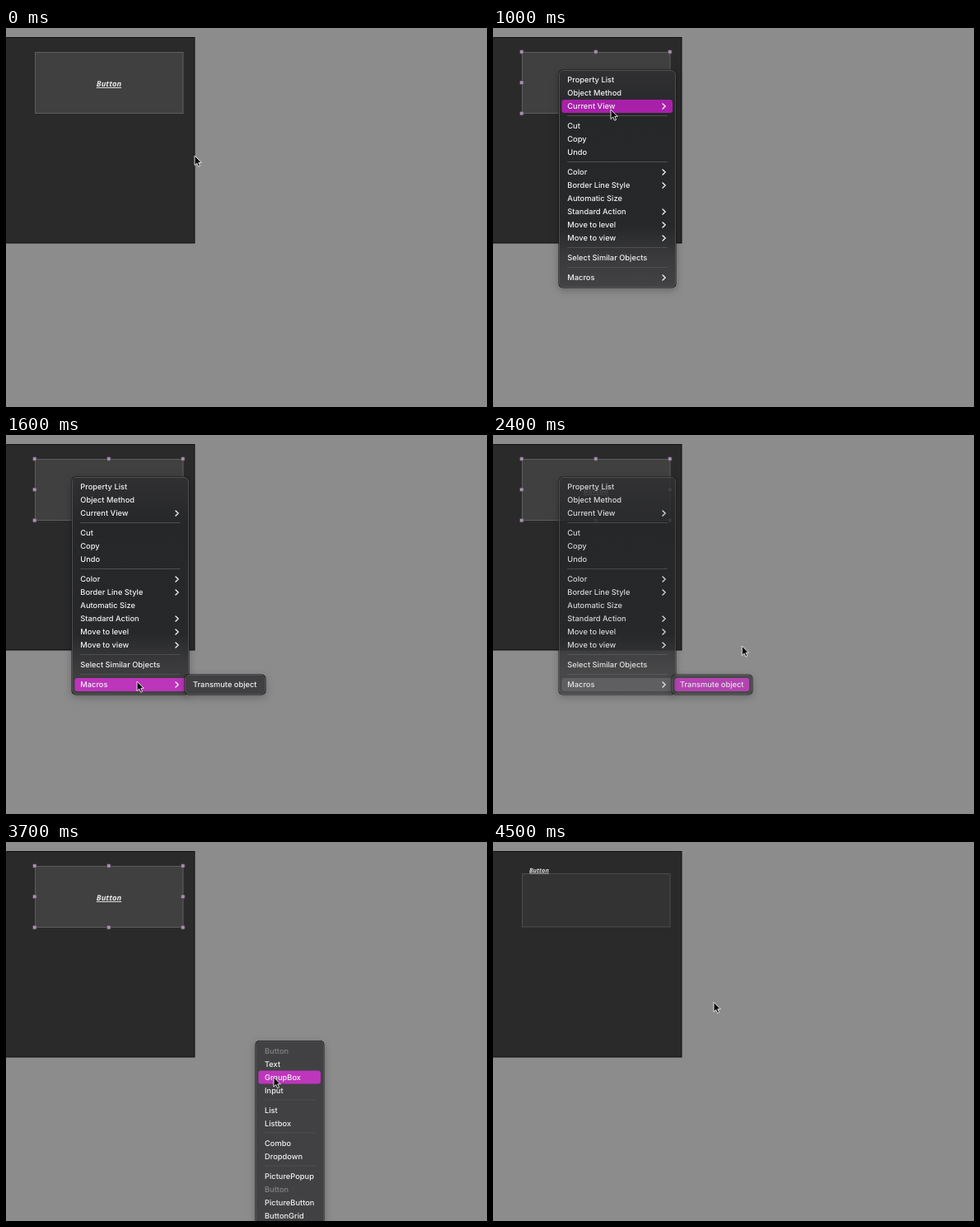
These frames come from a looping animation (584x460 px, 4600 ms). An HTML page:

```html
<!DOCTYPE html>
<html lang="en">
<head>
<meta charset="utf-8">
<title>Transmute object</title>
<style>
  html, body { margin: 0; width: 100%; height: 100%; overflow: hidden; background: #8c8c8c; }
  svg { display: block; }
  text { font: 500 9.3px Inter, Roboto, sans-serif; fill: #f2f2f2; text-rendering: geometricPrecision; }
  .label { font: italic 700 9.4px "Open Sans", "Noto Sans", sans-serif; fill: #e6e6e6; text-decoration: underline; }
  .small { font-size: 7.4px; fill: #dadada; }
  .off { fill: #858587; }
  .sep { stroke: #4f4f51; }
  .chev { fill: none; stroke: #f0f0f0; stroke-width: 1.4; stroke-linecap: round; stroke-linejoin: round; }
  .menu { filter: drop-shadow(0 3px 5px rgba(0, 0, 0, .25)); }
</style>
</head>
<body>
<svg width="584" height="460" viewBox="0 0 584 460">
  <defs>
    <linearGradient id="glass" x1="0" y1="51" x2="0" y2="315" gradientUnits="userSpaceOnUse">
      <stop offset="0" stop-color="#303032"/>
      <stop offset=".22" stop-color="#262729"/>
      <stop offset=".72" stop-color="#27282a"/>
      <stop offset=".86" stop-color="#3a3a3c"/>
      <stop offset="1" stop-color="#434345"/>
    </linearGradient>
    <linearGradient id="accent" x1="0" y1="95" x2="0" y2="303" gradientUnits="userSpaceOnUse">
      <stop offset="0" stop-color="#a820aa"/>
      <stop offset="1" stop-color="#bc35bb"/>
    </linearGradient>
  </defs>
  <rect width="584" height="460" fill="#8c8c8c"/>
  <rect x="-2" y="11.5" width="231" height="249.5" fill="#2a2a2a" stroke="#101010"/>
  <g id="button">
    <rect x="35.5" y="29.5" width="179.5" height="74" fill="#404040" stroke="#5e5e5e"/>
    <text class="label" x="125" y="71" text-anchor="middle">Button</text>
  </g>
  <g id="group">
    <rect x="35.5" y="38.5" width="179.5" height="64.5" fill="#333" stroke="#4c4c4c"/>
    <text class="label small" x="44" y="36.7">Button</text>
  </g>
  <g id="handles"></g>
  <g id="menus"></g>
  <path id="cursor" d="M0 0V11.6L2.7 9.1L4.6 13.2L6.6 12.3L4.8 8.3H8.3Z" fill="#0a0a0a" stroke="#f4f4f4" stroke-width=".9" stroke-linejoin="round"/>
</svg>
<script>
const LOOP = 4600, TICK = 100, ROW = 16, GAP = 8;
const $ = id => document.getElementById(id);

function add(parent, tag, attrs, text) {
  const el = document.createElementNS("http://www.w3.org/2000/svg", tag);
  for (const k in attrs) el.setAttribute(k, attrs[k]);
  if (text) el.textContent = text;
  return parent.appendChild(el);
}
const show = (el, alpha) => el.setAttribute("opacity", +alpha);

// Eight handles around the button
for (let i = 0; i < 9; i++)
  if (i !== 4)
    add($("handles"), "rect", { x: 32.5 + 90 * (i % 3), y: 26.7 + 37.3 * Math.floor(i / 3),
      width: 4.6, height: 4.6, rx: 1.2, fill: "#a892ae", stroke: "#4a404d", "stroke-width": .8 });

// Items: "-" separator, ">" suffix for a submenu, "!" prefix for disabled.
function makeMenu(x, y, w, h, fill, inset, items) {
  const g = add($("menus"), "g", { class: "menu" });
  add(g, "rect", { x: x - .5, y: y - .5, width: w + 1, height: h + 1, rx: 5, fill: "#151516" });
  add(g, "rect", { x: x + .5, y: y + .5, width: w - 1, height: h - 1, rx: 4.5, fill, stroke: "#5b5b5d", "stroke-width": .8 });
  const bar = add(g, "rect", { x: x + 3.5, width: w - 7.5, height: ROW, rx: 3 });
  const rows = [];
  let top = y + 4;
  for (const item of items.split(" / ")) {
    if (item === "-") {
      const mid = top + 3.5;
      add(g, "line", { class: "sep", x1: x + inset, x2: x + w - inset, y1: mid, y2: mid });
      top += GAP;
      continue;
    }
    const off = item.startsWith("!"), name = item.replace(/[!>]/g, "");
    add(g, "text", { x: x + inset, y: top + 11.3, class: off ? "off" : "" }, name);
    if (item.endsWith(">")) add(g, "path", { class: "chev", d: `M${x + w - 16} ${top + 5}l3.2 3l-3.2 3` });
    rows.push({ top, off, name });
    top += ROW;
  }
  return {
    show: alpha => show(g, alpha),
    // Highlights the named row, or else the one under the pointer.
    mark(px, py, color, name) {
      const row = rows.find(r => name ? r.name === name
        : !r.off && px > x && px < x + w && py >= r.top && py < r.top + ROW);
      show(bar, !!row);
      bar.setAttribute("y", row ? row.top : y);
      bar.setAttribute("fill", color);
    }
  };
}

const main = makeMenu(80, 51, 142, 264, "url(#glass)", 10.3,
  "Property List / Object Method / Current View> / - / Cut / Copy / Undo / - / " +
  "Color> / Border Line Style> / Automatic Size / Standard Action> / Move to level> / Move to view> / - / " +
  "Select Similar Objects / - / Macros>");
const sub = makeMenu(217, 291, 98, 24, "#404042", 10, "Transmute object");
const types = makeMenu(303, 241.5, 83, 260, "#414143", 11,
  "!Button / Text / GroupBox / Input / - / List / Listbox / - / Combo / Dropdown / - / " +
  "PicturePopup / !Button / PictureButton / ButtonGrid");

// Pointer moves: when, to where; each eases from the place before.
const home = [229, 155];
const moves = [
  { from: 0, to: 500, at: [80, 51] },
  { from: 600, to: 1000, at: [143, 99] },
  { from: 1000, to: 1500, at: [159, 299] },
  { from: 1600, to: 2100, at: [303, 300] },
  { from: 2200, to: 2500, at: [302, 240.5] },
  { from: 2600, to: 3200, at: [325, 420] },
  { from: 3200, to: 3700, at: [325, 285.5] },
  { from: 3800, to: 4000, at: [232, 113] },
  { from: 4400, to: 4500, at: [268, 194.5] },
  { from: 4500, to: LOOP, at: home }
];
const ease = k => k * k * (3 - 2 * k);

function pointAt(t) {
  return moves.reduce(([x, y], { from, to, at }) => {
    const k = ease(Math.min(1, Math.max(0, (t - from) / (to - from))));
    return [x + (at[0] - x) * k, y + (at[1] - y) * k];
  }, home);
}

// Visible from a until b, with one softer tick just before b.
const span = (t, a, b, last) => t < a || t >= b ? 0 : t >= b - TICK ? last : 1;

function draw(ms) {
  const t = Math.floor(ms % LOOP / TICK) * TICK;
  const [x, y] = pointAt(t);
  $("cursor").setAttribute("transform", `translate(${x} ${y})`);

  const grouped = t >= 4100;
  show($("button"), !grouped);
  show($("group"), grouped);
  show($("handles"), t >= 500 && !grouped);

  const inSub = x > 217, alpha = span(t, 600, 2500, .86);
  main.show(alpha);
  main.mark(x, y, inSub ? "#58585a" : "url(#accent)", inSub && "Macros");
  sub.show(t >= 1500 ? alpha : 0);
  sub.mark(x, y, "#bb38b9", inSub && "Transmute object");
  types.show(span(t, 2600, 4000, .6));
  types.mark(x, y, "#bd36bc", t >= 3700 && "GroupBox");
}

const start = performance.now();
function frame() {
  draw(performance.now() - start);
  requestAnimationFrame(frame);
}
frame();
</script>
</body>
</html>
```
